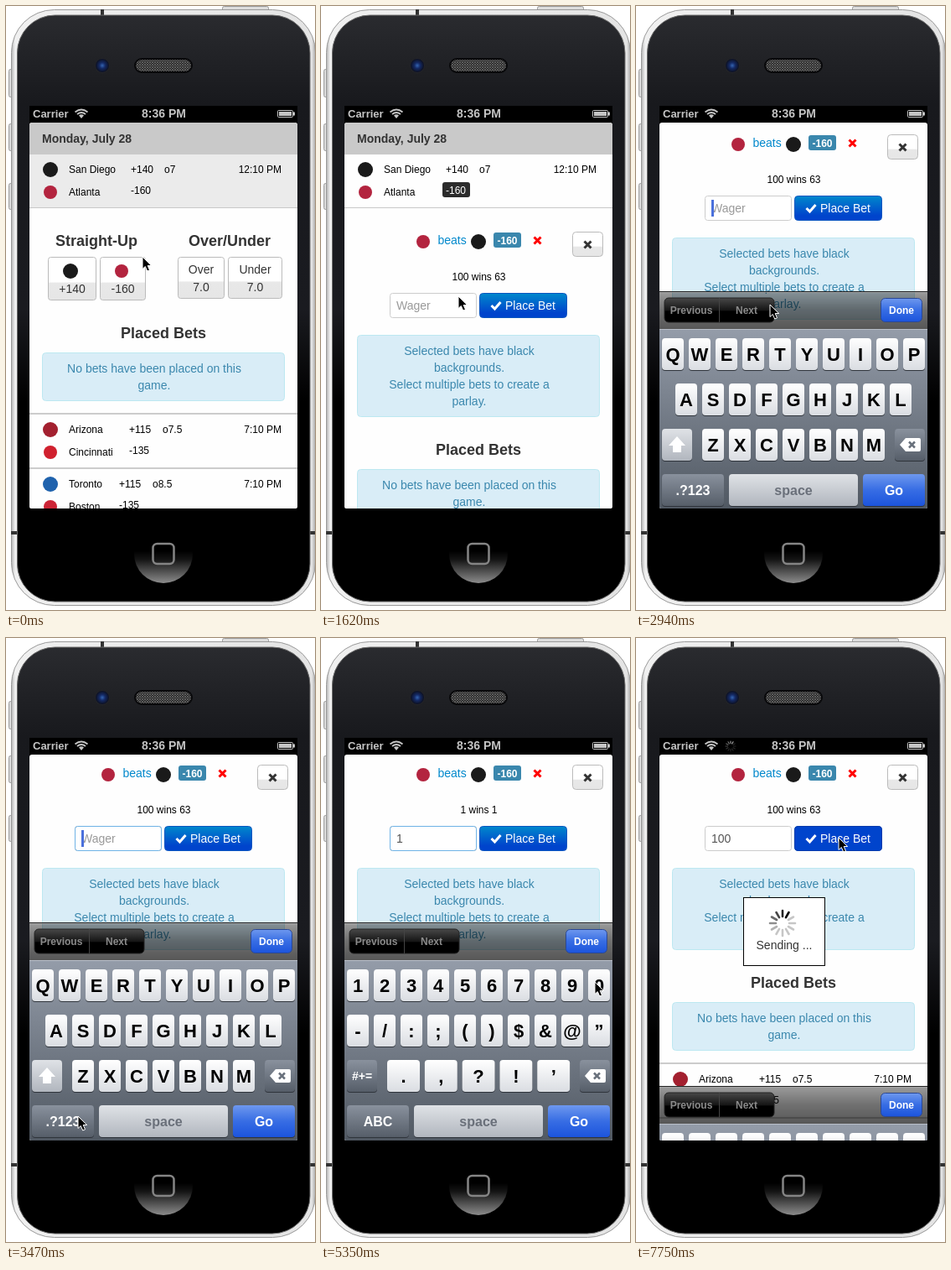
Recreate the animation shown at these times as an HTML page. Size 369 by 720 pixels, loop 8 s.

```html
<!DOCTYPE html>
<html lang="en">
<head>
<meta charset="utf-8">
<title>Placing a bet</title>
<style>
html, body { margin: 0; width: 100%; height: 100%; overflow: hidden; background: #fff; }
svg { display: block; width: 369px; height: 720px; font: 12px "Liberation Sans", Arial, sans-serif; }
.b { font-weight: bold; }
.m { text-anchor: middle; }
.t14 { font-size: 14px; }
.t16 { font-size: 16px; }
.h { font-size: 18px; font-weight: bold; text-anchor: middle; fill: #333; }
.info rect { fill: #d9edf7; stroke: #bce8f1; }
.info text { fill: #3a87ad; font-size: 14px; text-anchor: middle; }
.btn { fill: url(#btn); stroke: #bbb; }
.key { filter: drop-shadow(0 1px 0 #2f343b); }

.anim { animation: 8s step-end infinite; }
#cursor { animation-name: cursor; }
#page { animation-name: page; }
#lower { animation-name: lower; }
#kb { animation-name: kb; }
#caret { animation-name: caret; }
#idle { animation-name: idle; }
#slip { animation-name: slip; }
#letters { animation-name: letters; }
#digits { animation-name: digits; }
#popup { animation-name: popup; }
#w0 { animation-name: w0; }
#w1 { animation-name: w1; }
#w2 { animation-name: w2; }
#w3 { animation-name: w3; }
#focus { animation-name: focus; }
.sending { animation-name: sending; }

@keyframes cursor {
  0% { transform: translate(163px, 299px); }
  3.375% { transform: translate(147px, 329px); }
  6.75% { transform: translate(139px, 335px); }
  20.25% { transform: translate(164px, 346px); }
  23.5% { transform: translate(161px, 354px); }
  30.125% { transform: translate(160px, 356px); }
  40.125% { transform: translate(112px, 500px); }
  43.375% { transform: translate(86px, 570px); }
  50.125% { transform: translate(86px, 568px); }
  53.5% { transform: translate(51px, 421px); }
  60.125% { transform: translate(56px, 412px); }
  63.5% { transform: translate(310px, 405px); }
  66.875% { transform: translate(327px, 410px); }
  77% { transform: translate(292px, 340px); }
  80.25% { transform: translate(251px, 272px); }
  83.625%, 100% { transform: translate(242px, 238px); }
}
@keyframes page {
  0% { transform: none; }
  36.75% { transform: translateY(-116px); }
  40.125%, 100% { transform: translateY(-118px); }
}
@keyframes lower { 0% { transform: none; } 20.25%, 100% { transform: translateY(139px); } }
@keyframes kb {
  0% { transform: translateY(300px); }
  36.75% { transform: translateY(1px); }
  40.125% { transform: none; }
  96.875%, 100% { transform: translateY(195px); }
}
@keyframes caret {
  0% { opacity: 0; transform: none; }
  36.75% { opacity: 1; transform: none; }
  60.125% { opacity: 1; transform: translateX(7px); }
  66.875% { opacity: 0; transform: translateX(7px); }
  70.25% { opacity: 1; transform: translateX(15px); }
  73.625% { opacity: 1; transform: translateX(22px); }
  80.25% { opacity: 0; transform: translateX(22px); }
  87% { opacity: 1; transform: translateX(22px); }
  93.625%, 100% { opacity: 0; transform: translateX(22px); }
}
@keyframes idle { 0% { visibility: visible; } 20.25%, 100% { visibility: hidden; } }
@keyframes slip { 0% { opacity: 0; } 20.25%, 100% { opacity: 1; } }
@keyframes letters { 0% { visibility: visible; } 46.75%, 100% { visibility: hidden; } }
@keyframes digits { 0% { visibility: hidden; } 46.75%, 100% { visibility: visible; } }
@keyframes popup { 0%, 60.125%, 100% { visibility: hidden; } 56.75% { visibility: visible; } }
@keyframes w0 { 0% { visibility: visible; } 60.125%, 100% { visibility: hidden; } }
@keyframes w1 { 0%, 70.25%, 100% { visibility: hidden; } 60.125% { visibility: visible; } }
@keyframes w2 { 0%, 73.625%, 100% { visibility: hidden; } 70.25% { visibility: visible; } }
@keyframes w3 { 0% { visibility: hidden; } 73.625%, 100% { visibility: visible; } }
@keyframes focus { 0%, 96.875%, 100% { visibility: hidden; } 40.125% { visibility: visible; } }
@keyframes sending { 0% { visibility: hidden; } 96.875%, 100% { visibility: visible; } }
</style>
</head>
<body>
<svg viewBox="0 0 369 720">
  <defs>
    <linearGradient id="steel"><stop stop-color="#b4b4b4"/><stop offset=".012" stop-color="#f0f0f0"/><stop offset=".988" stop-color="#e4e4e4"/><stop offset="1" stop-color="#aaa"/></linearGradient>
    <linearGradient id="face" x2="0" y2="1"><stop stop-color="#2a2b2f"/><stop offset=".15" stop-color="#18191d"/><stop offset=".5" stop-color="#1a1b20"/><stop offset=".66" stop-color="#000"/></linearGradient>
    <linearGradient id="home" x2="0" y2="1"><stop offset=".45" stop-color="#000"/><stop offset=".6" stop-color="#151515"/><stop offset="1" stop-color="#8c8c8c"/></linearGradient>
    <linearGradient id="btn" x2="0" y2="1"><stop offset=".58" stop-color="#fff"/><stop offset=".6" stop-color="#e8e8e8"/><stop offset="1" stop-color="#e6e6e6"/></linearGradient>
    <linearGradient id="blue" x2="0" y2="1"><stop stop-color="#08c"/><stop offset=".8" stop-color="#04c"/></linearGradient>
    <linearGradient id="bar" x2="0" y2="1"><stop stop-opacity=".38"/><stop offset=".5" stop-opacity=".56"/><stop offset="1" stop-opacity=".66"/></linearGradient>
    <linearGradient id="black" x2="0" y2="1"><stop stop-color="#484848"/><stop offset=".5" stop-color="#161616"/><stop offset=".55" stop-color="#000"/></linearGradient>
    <linearGradient id="board" x2="0" y2="1"><stop stop-color="#949ca9"/><stop offset="1" stop-color="#505862"/></linearGradient>
    <linearGradient id="light" x2="0" y2="1"><stop stop-color="#fff"/><stop offset="1" stop-color="#dadde2"/></linearGradient>
    <linearGradient id="pale" x2="0" y2="1"><stop stop-color="#dfe2e6"/><stop offset="1" stop-color="#b1b6be"/></linearGradient>
    <linearGradient id="dark" x2="0" y2="1"><stop stop-color="#89919d"/><stop offset="1" stop-color="#565e69"/></linearGradient>
    <linearGradient id="go" x2="0" y2="1"><stop stop-color="#6e98ee"/><stop offset=".5" stop-color="#376de4"/><stop offset="1" stop-color="#1c54dc"/></linearGradient>
    <radialGradient id="lens"><stop stop-color="#3564b0"/><stop offset=".4" stop-color="#142a66"/><stop offset="1" stop-color="#0c0d18"/></radialGradient>
    <pattern id="mesh" width="3" height="3" patternUnits="userSpaceOnUse"><rect width="3" height="3" fill="#222"/><circle cx="1" cy="1" r=".9" fill="#777"/><circle cx="2.5" cy="2.5" r=".7" fill="#666"/></pattern>
    <clipPath id="screen"><path d="M28 142q0-3 3-3h314q3 0 3 3V597q0 2-2 2H30q-2 0-2-2Z"/></clipPath>
  </defs>

  <!-- Phone -->
  <g fill="#ddd" stroke="#999">
    <rect x="258.500" y=".5" width="55" height="8" rx="2"/>
    <rect x="3.500" y="75.500" width="8" height="33" rx="2"/>
    <rect x="3.500" y="140.500" width="8" height="32" rx="2"/>
    <rect x="3.500" y="211.500" width="8" height="31" rx="2"/>
  </g>
  <rect x="6.500" y="4.500" width="363" height="710" rx="51" fill="url(#steel)" stroke="#999"/>
  <path d="M113 4h4v7h-4ZM6 626h8v4H6ZM362 626h7v4h-7Z" fill="#333"/>
  <rect x="13.500" y="11" width="349.500" height="699" rx="45" fill="url(#face)" stroke="#666"/>
  <circle cx="115" cy="71" r="8.500" fill="url(#lens)" stroke="#25262b"/>
  <rect x="154" y="63" width="68" height="16" rx="8" fill="url(#mesh)" stroke="#08080a" stroke-width="2"/>
  <circle cx="188" cy="653" r="35" fill="url(#home)"/>
  <rect x="175.500" y="641" width="25" height="24" rx="5" fill="none" stroke="#858585" stroke-width="2.500"/>

  <!-- Status bar -->
  <rect x="28" y="119" width="320" height="24"/>
  <g class="b" fill="#c4c4c4">
    <text x="32" y="133" font-size="13">Carrier</text>
    <text x="188.500" y="133" class="m t14">8:36 PM</text>
    <path d="M90 134l-3-3.500q3-2.500 6 0Z"/>
    <path d="M85 129q5-4 10 0M82.500 126.500q7.500-6 15 0" fill="none" stroke="#c4c4c4" stroke-width="1.800"/>
    <rect x="324.500" y="124.500" width="18" height="8" rx="1" fill="none" stroke="#c4c4c4"/>
    <path d="M326 126h15v5h-15ZM343 126.500h2v4h-2Z"/>
  </g>
  <g id="net" class="anim sending" stroke="#aaa"></g>

  <g clip-path="url(#screen)">
    <rect x="28" y="139" width="320" height="460" fill="#fefefe"/>
    <g id="page" class="anim">
      <rect x="28" y="139" width="320" height="38" fill="#c9c9c9"/>
      <text x="43" y="163" class="b t14" fill="#333">Monday, July 28</text>
      <g id="idle" class="anim">
        <rect x="28" y="177" width="320" height="63" fill="#ebebeb"/>
        <text x="149" y="224">-160</text>
        <text x="108" y="286" class="h">Straight-Up</text>
        <text x="267" y="286" class="h">Over/Under</text>
        <g class="btn">
          <rect x="50.500" y="299.500" width="57" height="51" rx="3"/>
          <rect x="112.500" y="299.500" width="54" height="51" rx="3"/>
          <rect x="205.500" y="299.500" width="55" height="49" rx="3"/>
          <rect x="265.500" y="299.500" width="64" height="49" rx="3"/>
        </g>
        <circle cx="77" cy="316" r="9" fill="#1a1a1a"/>
        <circle cx="138" cy="316" r="8" fill="#b3243f"/>
        <g class="m t14" fill="#333">
          <text x="79" y="342">+140</text><text x="139.500" y="342">-160</text>
          <text x="233" y="319">Over</text><text x="233" y="340">7.0</text>
          <text x="297.500" y="319">Under</text><text x="297.500" y="340">7.0</text>
        </g>
      </g>
      <g id="first"></g>
      <path d="M28 240.500h320" stroke="#c8c8c8"/>

      <g id="slip" class="anim">
        <rect x="145" y="210" width="33" height="18" rx="3" fill="#2b2b2b"/>
        <text x="149" y="224" fill="#fff">-160</text>
        <circle cx="122" cy="281" r="8" fill="#b3243f"/>
        <text x="139.500" y="284" class="t14" fill="#08c">beats</text>
        <circle cx="188" cy="281" r="9" fill="#1a1a1a"/>
        <rect x="206" y="270" width="33" height="18" rx="3" fill="#3a87ad"/>
        <text x="222.500" y="284" class="b m" fill="#fff">-160</text>
        <path d="M254.500 275.500l8 8m0-8l-8 8" stroke="#f00" stroke-width="3"/>
        <rect x="300.500" y="269.500" width="36" height="29" rx="4" class="btn"/>
        <path d="M314.500 280.500l8 8m0-8l-8 8" stroke="#333" stroke-width="3"/>
        <rect x="82.500" y="342.500" width="103" height="29" rx="3" fill="#fff" stroke="#ccc"/>
        <rect id="focus" class="anim" x="82.500" y="342.500" width="103" height="29" rx="3" fill="none" stroke="#6fb3e6"/>
        <g id="wager"></g>
        <rect id="caret" class="anim" x="90" y="347" width="3" height="20" fill="#4a70dc"/>
        <rect x="189.500" y="342.500" width="104" height="29" rx="4" fill="url(#blue)" stroke="#0a55c0"/>
        <rect class="anim sending" x="189.500" y="342.500" width="104" height="29" rx="4" fill="#04c" stroke="#0039ab"/>
        <path d="M203.500 357l4 4 7-8" fill="none" stroke="#fff" stroke-width="3"/>
        <text x="220" y="362" class="t14" fill="#fff">Place Bet</text>
        <g class="info">
          <rect x="43.500" y="392.500" width="289" height="97" rx="4"/>
          <text x="177" y="416">Selected bets have black</text>
          <text x="177" y="436">backgrounds.</text>
          <text x="177" y="456">Select multiple bets to create a</text>
          <text x="177" y="476">parlay.</text>
        </g>
      </g>

      <g id="lower" class="anim">
        <text x="188" y="396" class="h">Placed Bets</text>
        <g class="info">
          <rect x="43.500" y="413.500" width="289" height="57" rx="4"/>
          <text x="177" y="437">No bets have been placed on this</text>
          <text x="177" y="457">game.</text>
        </g>
        <path d="M28 486h320M28 551h320" stroke="#ccc" stroke-width="2"/>
        <g id="games"></g>
      </g>
    </g>

    <g class="anim sending">
      <rect x="128.500" y="309.500" width="97" height="81" fill="#fff" stroke="#000"/>
      <text x="177" y="371" class="m t14" fill="#333">Sending ...</text>
      <g id="spin" stroke="#000"></g>
    </g>

    <g id="kb" class="anim">
      <rect x="28" y="339" width="320" height="45" fill="url(#bar)"/>
      <path d="M28 339.500h320" stroke="#222"/>
      <path d="M28 340.500h320" stroke="#aaa" opacity=".6"/>
      <rect x="34" y="347" width="131" height="29" rx="5" fill="url(#black)" stroke="#222"/>
      <path d="M99.500 347v29" stroke="#444"/>
      <rect x="292.500" y="347.500" width="49" height="28" rx="5" fill="url(#go)" stroke="#2a4792"/>
      <g class="b m" fill="#8b8b8b">
        <text x="66" y="366">Previous</text><text x="132" y="366">Next</text>
        <text x="317" y="366" fill="#fff">Done</text>
      </g>
      <rect x="28" y="384" width="320" height="216" fill="url(#board)"/>
      <path d="M28 384.500h320" stroke="#b8bec8"/>
      <g id="letters" class="anim"></g>
      <g id="digits" class="anim"></g>
      <g id="common"></g>
      <g id="popup" class="anim">
        <path d="M34 329.500h34q6 0 6 6v36q0 6-7 10t-9 12v37q0 4-4 4H33q-4 0-4-4V335q0-5.500 5-5.500Z" fill="url(#light)" stroke="#666e79"/>
        <text x="50" y="370" class="b m" font-size="38">1</text>
      </g>
    </g>
  </g>

  <path id="cursor" class="anim" d="M0 0V14.500L3.300 11.500 5.700 17 8.500 15.800 6.200 10.500H10.700Z" stroke="#fff" stroke-width="1"/>
</svg>

<script>
const add = (id, html) => document.getElementById(id).insertAdjacentHTML('beforeend', html);
const text = (x, y, s, attrs = '') => `<text x="${x}" y="${y}" ${attrs}>${s}</text>`;

// Game rows: y is the first baseline, x the odds column
function game(y, x, time, [away, awayColor, odds, total], [home, homeColor, homeOdds]) {
  return `<circle cx="53" cy="${y - 4}" r="9" fill="${awayColor}"/>` +
    `<circle cx="53" cy="${y + 23}" r="8" fill="${homeColor}"/>` +
    text(75, y, away) + text(75, y + 27, home) +
    text(x, y, odds) + text(x + 40, y, total) + text(x, y + 25, homeOdds) +
    text(329, y, time, 'text-anchor="end"');
}
add('first', game(199, 149, '12:10 PM', ['San Diego', '#1a1a1a', '+140', 'o7'], ['Atlanta', '#b3243f', '']));
add('games',
  game(509, 147, '7:10 PM', ['Arizona', '#a3202f', '+115', 'o7.5'], ['Cincinnati', '#d0202e', '-135']) +
  game(574, 135, '7:10 PM', ['Toronto', '#1f62ad', '+115', 'o8.5'], ['Boston', '#cc2436', '-135']));

// Wager states
['', 1, 10, 100].forEach((sum, i) => {
  const stake = sum || 100;
  add('wager', `<g id="w${i}" class="anim">` +
    text(188.500, 327, `${stake} wins ${Math.round(stake / 1.6)}`, 'class="m"') +
    text(90, 362, sum || 'Wager', `class="t14" fill="${sum ? '#555' : '#999'}"`) + '</g>');
});

// Keyboard
const rowY = row => 395 + 54 * row;
function key(x, row, w, label, fill = 'light', color = '#000', size = 22) {
  const y = rowY(row);
  return `<rect class="key" x="${x}" y="${y}" width="${w}" height="38" rx="4" fill="url(#${fill})"/>` +
    text(x + w / 2, y + 19 + size * .36, label, `class="b m" fill="${color}" font-size="${size}"`);
}
const keys = (chars, row, x, step = 32, w = 26) =>
  [...chars].map((c, i) => key(x + i * step, row, w, c.replace('&', '&amp;'))).join('');

add('letters', keys('QWERTYUIOP', 0, 31) + keys('ASDFGHJKL', 1, 47) + keys('ZXCVBNM', 2, 79) +
  key(31, 2, 36, '', 'pale') + '<path d="M49 512l10 11h-5v8H44v-8h-5Z" fill="#fff"/>' +
  key(31, 3, 74, '.?123', 'dark', '#fff', 16));
add('digits', keys('1234567890', 0, 31) + keys('-/:;()$&@”', 1, 31) + keys('.,?!’', 2, 79, 44.8, 39) +
  key(31, 2, 36, '#+=', 'dark', '#fff', 14) + key(31, 3, 74, 'ABC', 'dark', '#fff', 16));
add('common', key(309, 2, 36, '', 'dark') +
  '<path d="M315 522l7-8h16q2 0 2 2v12q0 2-2 2h-16Z" fill="#fff"/>' +
  '<path d="M326 518.500l7 7m0-7l-7 7" stroke="#69717c" stroke-width="2.500"/>' +
  key(111, 3, 154, 'space', 'pale', '#6a707a', 16) + key(271, 3, 74, 'Go', 'go', '#fff', 16));

// Spinners
const spokes = (x, y, r1, r2, w) => Array.from({ length: 12 }, (_, i) =>
  `<path d="M${x} ${y - r1}V${y - r2}" transform="rotate(${30 - i * 30} ${x} ${y})" ` +
  `stroke-width="${w}" stroke-linecap="round" opacity="${Math.max(.22, 1 - i * .14)}"/>`).join('');
add('spin', spokes(175, 340, 8, 15, 2.6));
add('net', spokes(113, 129, 3.5, 6, 1.2));
</script>
</body>
</html>
```
